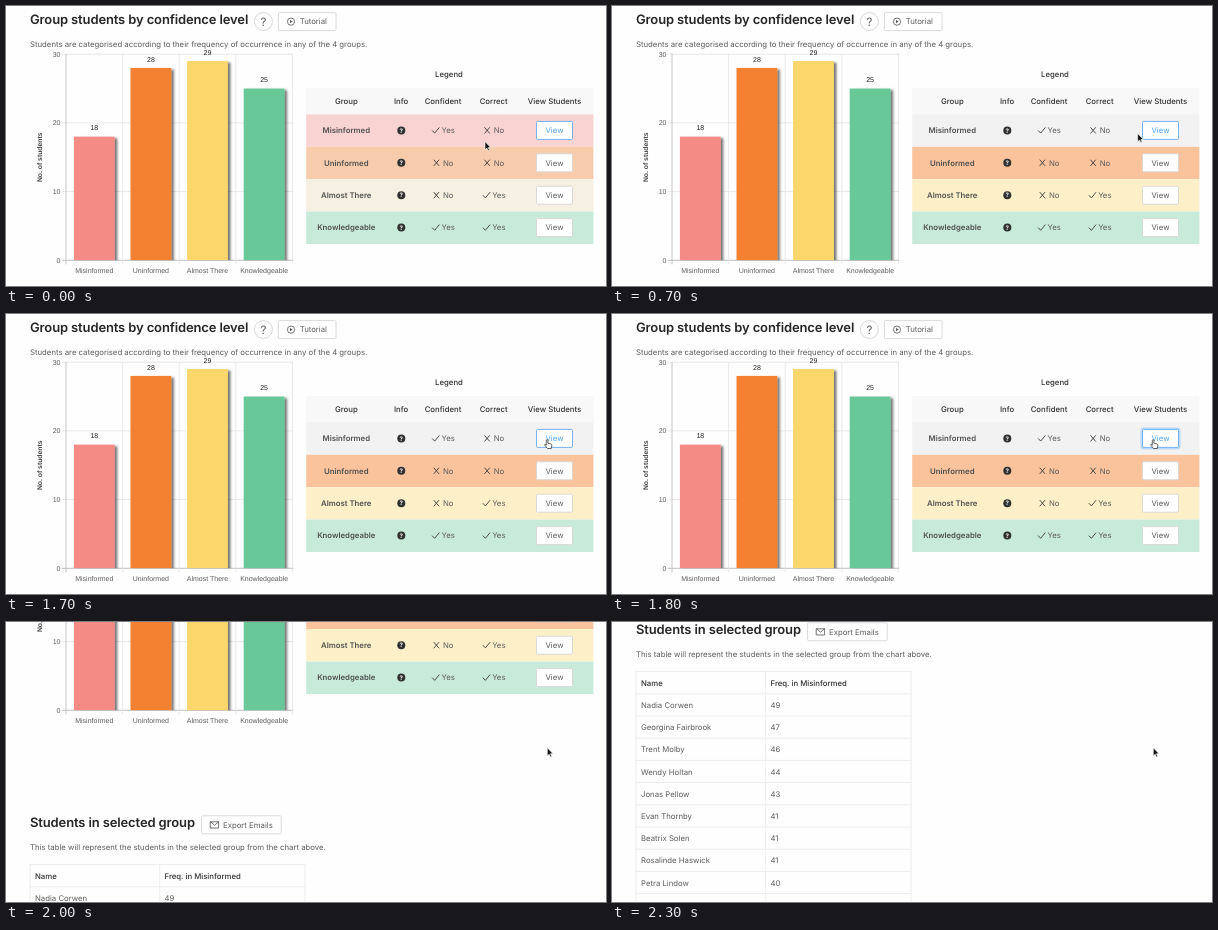
These frames come from a looping animation (600x280 px, 2.7 s). An HTML page:

```html
<!DOCTYPE html>
<html lang="en">
<head>
<meta charset="utf-8">
<title>Students by confidence level</title>
<style>
  html, body { margin: 0; width: 100%; height: 100%; overflow: hidden; background: #fefefe; }
  svg { display: block; width: 600px; height: 280px; }
  text { font-family: Inter, "Noto Sans", sans-serif; text-rendering: geometricPrecision; }
  .chart text { font-family: "Liberation Sans", Arial, sans-serif; }
  .line { fill: none; stroke-linecap: round; stroke-linejoin: round; }
</style>
</head>
<body>
<svg id="stage" viewBox="0 0 600 280"></svg>
<script>
const LOOP = 2700, STEP = 100;
const DARK = '#303030', MID = '#5c5c5c', BLUE = '#4fa5ee';

// y is the vertical middle of the capitals
const text = (s, x, y, { size = 7.77, weight = 400, fill = MID, anchor = 'start', extra = '' } = {}) =>
  `<text x="${x}" y="${y + size * .36}" font-size="${size}" font-weight="${weight}" fill="${fill}" text-anchor="${anchor}" ${extra}>${s}</text>`;
const centred = (s, x, y, o = {}) => text(s, x, y, { anchor: 'middle', ...o });
const rect = (x, y, w, h, fill, extra = '') =>
  `<rect x="${x}" y="${y}" width="${w}" height="${h}" fill="${fill}" ${extra}/>`;
const path = (d, stroke, width = .8) =>
  `<path class="line" d="${d}" stroke="${stroke}" stroke-width="${width}"/>`;
const button = (x, y, w, h, extra = '') =>
  rect(x, y, w, h, '#fff', `rx="1.2" stroke="#d6d6d6" stroke-width=".9" ${extra}`);
const heading = (s, y) =>
  text(s, 24, y, { size: 13, weight: 600, fill: '#262626', extra: 'letter-spacing="-.01em"' });

function header() {
  return heading('Group students by confidence level', 13.6) +
    '<circle cx="257.4" cy="15.5" r="9" fill="#fff" stroke="#cfcfcf" stroke-width=".8"/>' +
    centred('?', 257.4, 15.5, { size: 11.5 }) +
    button(272.4, 6.6, 57.6, 18) +
    '<circle cx="285" cy="15.6" r="3.6" fill="none" stroke="#555" stroke-width=".8"/>' +
    '<path d="M284 13.9l2.7 1.7-2.7 1.7z" fill="#555"/>' +
    text('Tutorial', 293.7, 15.7) +
    text('Students are categorised according to their frequency of occurrence in any of the 4 groups.', 24, 38);
}

function chart() {
  const base = 254.3, unit = 6.87, left = 60, slot = 56.6;
  const data = [['Misinformed', 18, '#f48b84'], ['Uninformed', 28, '#f48132'],
    ['Almost There', 29, '#fbd66b'], ['Knowledgeable', 25, '#69c898']];
  let grid = '', bars = '', labels = '';
  for (let v = 0; v <= 30; v += 10) {
    const y = base - v * unit;
    grid += path(`M56 ${y}H287`, v ? '#e2e2e2' : '#b0b0b0');
    labels += text(v, 54.5, y, { size: 7, anchor: 'end' });
  }
  for (let i = 0; i < 5; i++)
    grid += path(`M${left + i * slot} 48.2V258`, i ? '#e4e4e4' : '#b8b8b8');
  data.forEach(([name, value, fill], i) => {
    const mid = left + (i + .5) * slot, top = base - value * unit;
    bars += rect(mid - 20.4, top, 40.8, value * unit, fill, 'filter="url(#shade)"');
    labels += centred(value, mid, top - 8.9, { size: 7, fill: '#222' });
    labels += centred(name, mid, 264.5, { size: 7 });
  });
  labels += centred('No. of students', 0, 0,
    { size: 6.8, weight: 700, fill: '#444', extra: 'transform="translate(33.2 151.3) rotate(-90)"' });
  return `<g class="chart">${grid}<g clip-path="url(#plot)">${bars}</g>${labels}</g>`;
}

const ROW = 32.4, rowTop = i => 108.4 + i * ROW;
const groups = [['Misinformed', 1, 0], ['Uninformed', 0, 0], ['Almost There', 0, 1], ['Knowledgeable', 1, 1]];

function answer(yes, x, y) {
  return yes
    ? path(`M${x - 10.6} ${y + .3}l2.3 2.4 4.4-5.4`, '#3a3a3a', .9) + text('Yes', x - 1.5, y)
    : path(`M${x - 9} ${y - 2.8}l4.8 5.6m0-5.6l-4.8 5.6`, '#3a3a3a', .9) + text('No', x, y);
}

function legend() {
  const bold = { weight: 500, fill: DARK };
  let s = centred('Legend', 443, 68.5, bold) + rect(300.2, 82, 287.2, 26.6, '#f8f8f9');
  [['Group', 340.3], ['Info', 395], ['Confident', 437], ['Correct', 487.7], ['View Students', 548.5]]
    .forEach(([name, x]) => s += centred(name, x, 95, bold));
  groups.forEach(([name, confident, correct], i) => {
    const y = rowTop(i) + ROW / 2 - .2;
    s += rect(300.2, rowTop(i), 287.2, ROW, '#fff', `id="row${i}"`);
    s += centred(name, 340.3, y, { weight: 600, fill: '#505050' });
    s += `<circle cx="395.3" cy="${y}" r="4" fill="#303030"/>`;
    s += centred('?', 395.3, y, { size: 6.2, weight: 700, fill: '#fff' });
    s += answer(confident, 437, y) + answer(correct, 487.7, y);
    s += i ? '' : rect(529.4, y - 10, 38.2, 20, 'none', 'id="glow" rx="2" stroke="#1890ff" stroke-width="2" opacity="0"');
    s += button(530.5, y - 9, 36, 18, i ? '' : 'style="stroke:#66abf0"');
    s += centred('View', 548.5, y, { fill: i ? MID : BLUE });
  });
  return s;
}

function students() {
  const top = 408.6, row = 22.2, edge = '#e9e9e9';
  const rows = [['Name', 'Freq. in Misinformed'], ['Nadia Corwen', 49], ['Georgina Fairbrook', 47],
    ['Trent Molby', 46], ['Wendy Holtan', 44], ['Jonas Pellow', 43], ['Evan Thornby', 41],
    ['Beatrix Solen', 41], ['Rosalinde Haswick', 41], ['Petra Lindow', 40]];
  let s = heading('Students in selected group', 366.6) +
    button(195.6, 359.8, 79.6, 18) +
    path('M204.6 365.8h8v6.2h-8zl4 3.4 4-3.4', '#555') +
    text('Export Emails', 217, 368.8) +
    text('This table will represent the students in the selected group from the chart above.', 24, 391);
  rows.forEach(([name, count], i) => {
    const y = top + row * i, style = i ? {} : { weight: 500, fill: DARK };
    s += path(`M24 ${y}H299`, edge) + text(name, 29, y + 11.4, style) + text(count, 158.5, y + 11.4, style);
  });
  s += path(`M24 ${top + row * rows.length}H299`, edge);
  for (const x of [24, 153.7, 299]) s += path(`M${x} ${top}V660`, edge);
  return s;
}

const stage = document.getElementById('stage');
stage.innerHTML = `
  <defs>
    <filter id="shade" x="-20%" y="-10%" width="150%" height="120%">
      <feDropShadow dx="2.5" dy="1.5" stdDeviation="1.2" flood-color="#000" flood-opacity=".55"/>
    </filter>
    <clipPath id="plot">${rect(60, 44, 230, 210.3, '#000')}</clipPath>
  </defs>
  <g id="page">${header() + chart() + legend() + students()}</g>
  <g id="cursor" stroke-linejoin="round">
    <path id="arrow" d="M0 0V8.2L1.9 6.5 3.1 9.2 4.4 8.6 3.2 6H5.7Z" fill="#111" stroke="#fff" stroke-width=".6"/>
    <path id="hand" d="M-1 5.5V.8a.8.8 0 0 1 1.6 0V3.6l3 .6q1 .3 .9 1.3L4 8.8H.2L-2.6 5.4q-.2-1 .8-.7z"
      fill="#fff" stroke="#222" stroke-width=".7"/>
  </g>`;

const el = id => document.getElementById(id);
const mix = (a, b, k) => a + (b - a) * k;
const ramp = (t, from, to) => Math.min(1, Math.max(0, (t - from) / (to - from)));
const ease = k => k * k * (3 - 2 * k);
const blend = (a, b, k) => `rgb(${a.map((v, i) => Math.round(mix(v, b[i], k)))})`;

// row colours as the hover moves up to the first row
const fades = [
  [[248, 211, 209], [242, 242, 242]],
  [[247, 204, 173], [250, 195, 156]],
  [[245, 240, 226], [253, 240, 200]],
  [[200, 234, 219], [200, 234, 219]],
];
const scrolls = [42, 166, 266, 326, 359];
const SCROLL_START = 1900;

function draw(now) {
  const t = Math.floor(now % LOOP / STEP) * STEP;
  const scroll = t < SCROLL_START ? 0 : scrolls[Math.min(4, (t - SCROLL_START) / STEP)];
  el('page').setAttribute('transform', `translate(0 ${-scroll})`);
  fades.forEach(([from, to], i) => el('row' + i).setAttribute('fill', blend(from, to, ramp(t, 0, 300))));
  el('glow').setAttribute('opacity', t >= 1800 ? .25 : 0);

  const nudge = ramp(t, 0, 300), glide = ease(ramp(t, 300, 900));
  const x = mix(mix(479, 481, nudge), 541.3, glide);
  const y = mix(mix(135.6, 132.8, nudge), 125.7, glide);
  const pointing = x > 531 && t < 2000;
  el('cursor').setAttribute('transform', `translate(${x} ${y})`);
  el('hand').setAttribute('visibility', pointing ? 'visible' : 'hidden');
  el('arrow').setAttribute('visibility', pointing ? 'hidden' : 'visible');
}

const start = performance.now();
function tick() {
  draw(performance.now() - start);
  requestAnimationFrame(tick);
}
tick();
</script>
</body>
</html>
```
